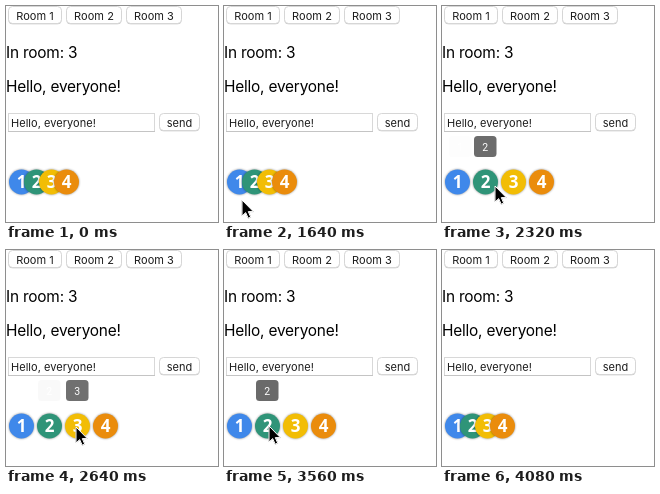
An HTML page that plays this animation: 212 px wide and 216 px high, repeating every 4120 ms.

```html
<!DOCTYPE html>
<html lang="en">
<head>
<meta charset="utf-8">
<title>Rooms</title>
<style>
  html, body { margin: 0; width: 100%; height: 100%; overflow: hidden; background: #fff; }
  svg { display: block; }
  .body { font: 15.4px Inter, sans-serif; letter-spacing: -.2px; }
  .ui { font: 11px Inter, sans-serif; letter-spacing: .04px; fill: #1c1c1c; }
  .mid { text-anchor: middle; }
  .badge text { font: 700 17px "Open Sans", sans-serif; fill: #fff; }
  .badge circle { filter: drop-shadow(0 .6px .8px rgba(0, 0, 0, .45)); }
  .tip { opacity: 0; }
  .tip rect { fill: #616161; fill-opacity: .94; }
  .tip text { font: 10.5px Roboto, sans-serif; fill: #fff; }
  #pointer { opacity: 0; filter: drop-shadow(0 .6px .7px rgba(0, 0, 0, .5)); }
</style>
</head>
<body>
<svg width="212" height="216" viewBox="0 0 212 216">
  <g id="buttons"></g>
  <text class="body" x="0" y="52">In room: 3</text>
  <text class="body" x="0" y="86">Hello, everyone!</text>
  <rect x="2.5" y="107.5" width="146" height="18" fill="#fff" stroke="#d8d8d8"/>
  <path d="M2 125.5H149" stroke="#c4c4c4"/>
  <text class="ui" x="5" y="121">Hello, everyone!</text>
  <g id="badges"></g>
  <g id="tips"></g>
  <path id="pointer" d="M0 0V16L3.7 12.6L6.2 18.2L8.7 17.1L6.3 11.6H11.3Z"
        stroke="#fff" stroke-linejoin="round"/>
</svg>
<script>
const LOOP = 4120, FADE = 200, STEP = 28, STACKED = 15;
const SMOOTH = 'cubic-bezier(.4, 0, .2, 1)';
const $ = id => document.getElementById(id);
const at = (x, y) => `translate(${x}px, ${y}px)`;

function add(parent, tag, attrs = {}, text = '') {
  const el = document.createElementNS('http://www.w3.org/2000/svg', tag);
  for (const k in attrs) el.setAttribute(k, attrs[k]);
  el.textContent = text;
  return parent.appendChild(el);
}

// steps: [ms, value, easing to the next step]; the ends of the loop are held
function play(el, prop, steps) {
  const all = [[0, steps[0][1]], ...steps, [LOOP, steps.at(-1)[1]]];
  const frames = all.map(([ms, value, easing = 'linear']) =>
    ({ offset: ms / LOOP, [prop]: value, easing }));
  el.animate(frames, { duration: LOOP, iterations: Infinity });
}

function button(x, y, w, label) {
  const g = $('buttons');
  const box = { x: x + .5, width: w - 1, height: 17, rx: 4 };
  add(g, 'rect', { ...box, y: y + 1.2, fill: '#bdbdbd' });
  add(g, 'rect', { ...box, y: y + .5, fill: '#fff', stroke: '#d6d6d6' });
  add(g, 'text', { class: 'ui mid', x: x + w / 2, y: y + 13.7 }, label);
  return x + w + 4;
}

let x = button(2, 0, 54, 'Room 1');
x = button(x, 0, 56, 'Room 2');
button(x, 0, 56, 'Room 3');
button(153, 107, 41, 'send');

// Which badge the pointer enters, and when; the last entry is the leave
const hovers = [
  { ms: 1790, badge: 0 }, { ms: 2150, badge: 1 }, { ms: 2490, badge: 2 },
  { ms: 2815, badge: 1 }, { ms: 3610 }
];
const open = hovers[0].ms, close = hovers.at(-1).ms;

['#3f88ea', '#2f9478', '#f2bd05', '#ea8c0c'].forEach((fill, i) => {
  // Badges slide apart on hover and stack again on leave
  const badge = add($('badges'), 'g', { class: 'badge' });
  add(badge, 'circle', { cx: 15.5, cy: 176, r: 12.5, fill });
  add(badge, 'text', { class: 'mid', x: 15.5, y: 182 }, i + 1);
  const shut = at(i * STACKED, 0), wide = at(i * STEP, 0);
  play(badge, 'transform', [
    [open, shut, 'ease'], [open + FADE, wide], [close, wide, 'ease'], [close + FADE, shut]
  ]);

  const steps = hovers.flatMap(({ ms, badge }, n) => badge !== i ? [] : [
    [ms, 0, SMOOTH], [ms + FADE, 1],
    [hovers[n + 1].ms, 1, SMOOTH], [hovers[n + 1].ms + FADE, 0]
  ]);
  if (!steps.length) return;
  const tip = add($('tips'), 'g', { class: 'tip' });
  const left = Math.max(7, 4 + i * STEP);
  add(tip, 'rect', { x: left, y: 130, width: 22.5, height: 21, rx: 3.5 });
  add(tip, 'text', { class: 'mid', x: left + 11.2, y: 144.5 }, i + 1);
  play(tip, 'opacity', steps);
});

// Pointer moves, with a rest after each
const moves = [
  { from: 1320, to: 1600, pos: at(18, 194) },
  { from: 1680, to: 1880, pos: at(15, 180) },
  { from: 2060, to: 2300, pos: at(53, 180) },
  { from: 2430, to: 2580, pos: at(70, 177) },
  { from: 2720, to: 3060, pos: at(45, 176) }
];
let rest = at(15, 217);
play($('pointer'), 'transform', moves.flatMap(({ from, to, pos }) => {
  const leg = [[from, rest, 'ease-out'], [to, pos]];
  rest = pos;
  return leg;
}));
play($('pointer'), 'opacity', [
  [moves[0].from, 0, 'step-start'], [moves[0].from + 1, 1], [close - 15, 1, 'step-start'], [close - 14, 0]
]);
</script>
</body>
</html>
```
